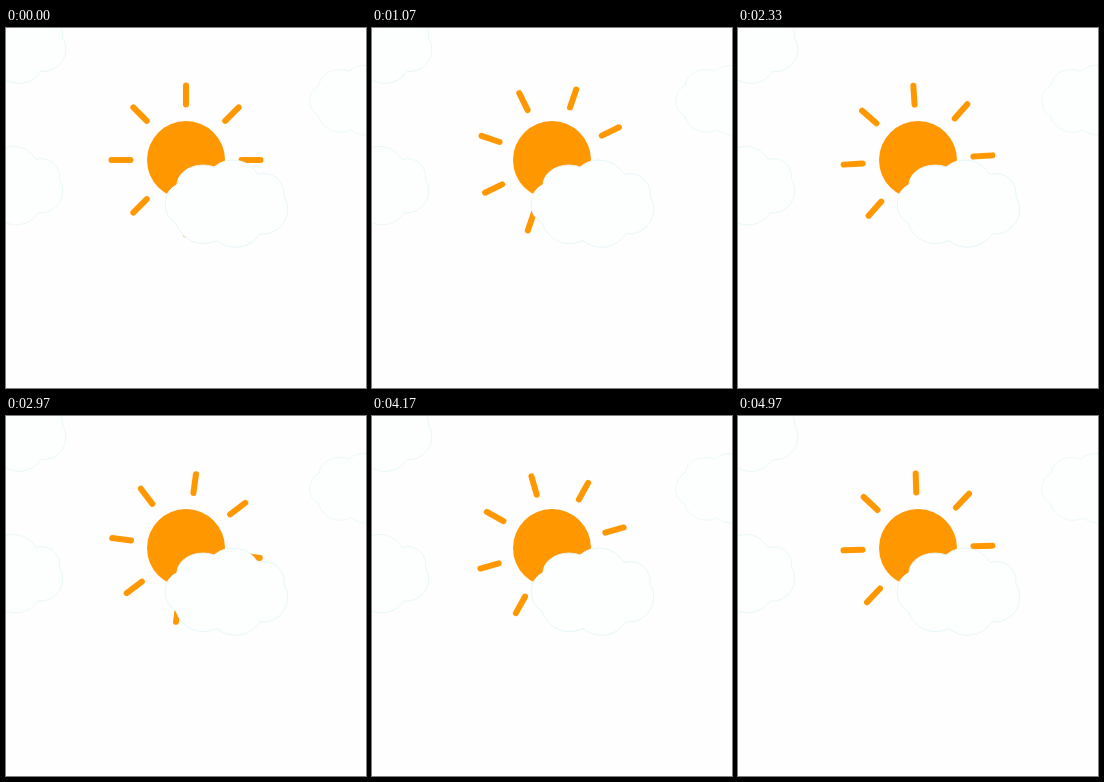
Animation, 360 px wide and 360 px high, one loop 5 s. Source, as an HTML page:

```html
<!DOCTYPE html>
<html lang="en">
<head>
<meta charset="utf-8">
<title>Sun behind clouds</title>
<style>
  html, body { margin: 0; width: 100%; height: 100%; overflow: hidden; background: #fefefe; }
  svg { display: block; width: 100%; height: 100%; }
</style>
</head>
<body>
<svg viewBox="0 0 360 360">
  <defs>
    <path id="cloud" fill="#fdfefe" stroke="#e6f7f8" stroke-width="1"
      d="M171 156.500 A26 20 0 0 1 208 139 A29 29 0 0 1 252 146.500
         A20 20 0 0 1 278 168 A25 25 0 0 1 254 206
         A29 29 0 0 1 211 212.500 A29 29 0 0 1 170 195
         A22 22 0 0 1 171 156.500 Z"/>
    <path id="ray" d="M0 -55.500 V-74.500" stroke="#ff9800" stroke-width="6" stroke-linecap="round"/>
  </defs>
  <use href="#cloud" transform="translate(-193.700 -141.900) scale(.9)"/>
  <use href="#cloud" transform="translate(-196.700 -.4) scale(.9)"/>
  <use href="#cloud" transform="translate(176.400 -68.200) scale(.8)"/>
  <g transform="translate(180 132)">
    <circle r="39" fill="#ff9800"/>
    <g id="rays"></g>
  </g>
  <use href="#cloud"/>
</svg>
<script>
  const LOOP = 5000;
  const FPS = 30;
  const DEGREES_PER_STEP = 0.592;
  const rays = document.getElementById("rays");

  for (let i = 0; i < 8; i++) {
    const ray = document.createElementNS("http://www.w3.org/2000/svg", "use");
    ray.setAttribute("href", "#ray");
    ray.setAttribute("transform", `rotate(${i * 45})`);
    rays.append(ray);
  }

  function draw(now) {
    // A small lead keeps steps aligned with times rounded to 10 ms.
    const step = Math.floor((now % LOOP + 4) * FPS / 1000) % (LOOP * FPS / 1000);
    rays.setAttribute("transform", `rotate(${step * DEGREES_PER_STEP})`);
  }

  const start = performance.now();
  function tick() {
    draw(performance.now() - start);
    requestAnimationFrame(tick);
  }
  tick();
</script>
</body>
</html>
```
